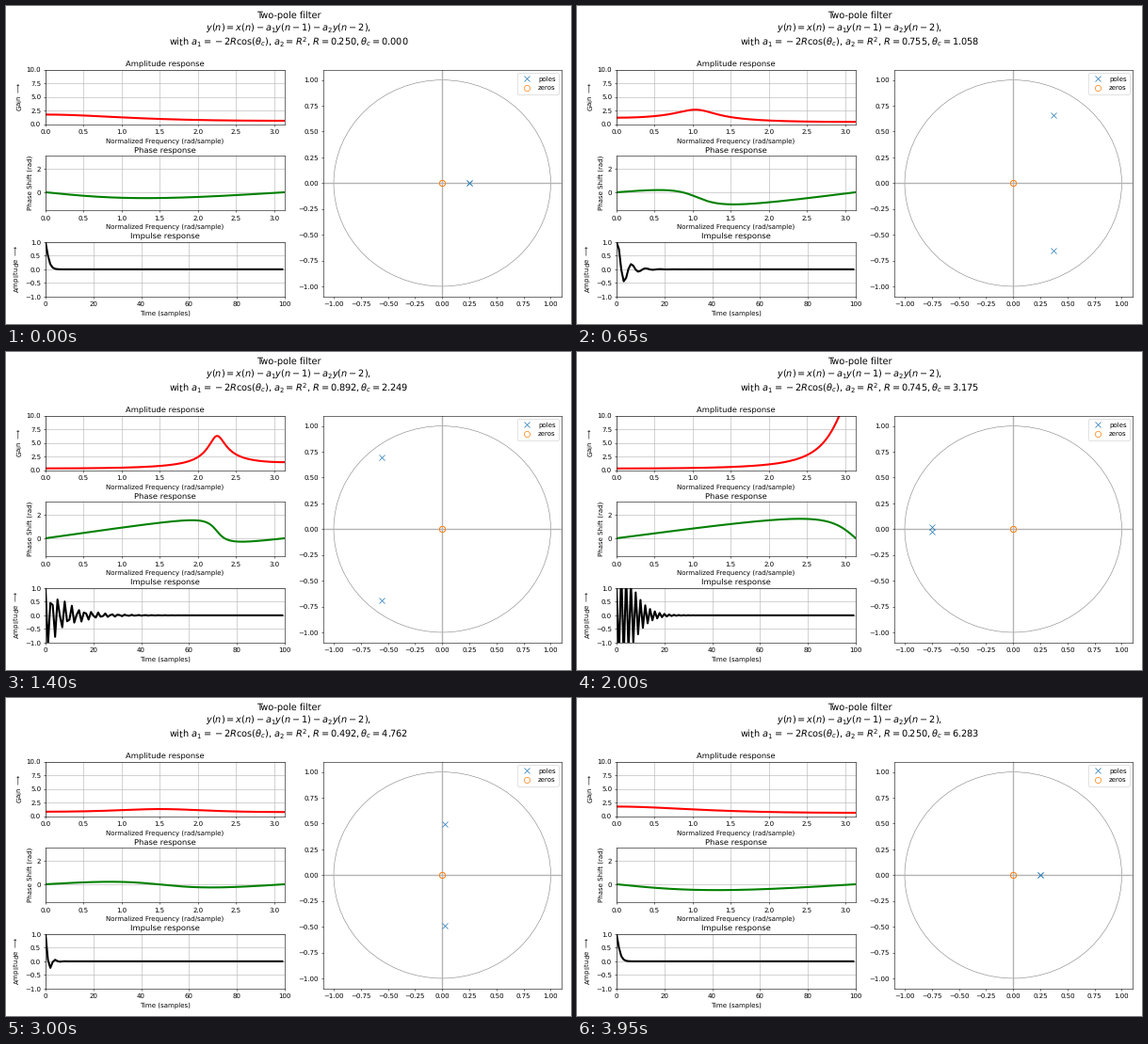
Write a matplotlib script that moves like this. It is 600 px wide and 338 px high and loops after 4000 ms.

```python
import numpy as np
import matplotlib.pyplot as plt
from matplotlib.animation import FuncAnimation
from matplotlib.patches import Circle

W, H, DPI = 600, 338, 50
FRAMES, STEPS = 80, 96
TOP, PANEL, GAP = 67.7, 58, 33.6

plt.rcParams.update({
    "font.family": "DejaVu Sans",
    "font.size": 10,
    "text.hinting": "none",
})

fig = plt.figure(figsize=(W / DPI, H / DPI), dpi=DPI, facecolor="white")


def add_axes(x0, x1, top, bottom):
    return fig.add_axes([x0 / W, 1 - bottom / H, (x1 - x0) / W, (bottom - top) / H])


def panel(row, title, xlabel, ylabel, xlim, ylim, xticks, yticks):
    top = TOP + row * (PANEL + GAP)
    ax = add_axes(42, 296, top, top + PANEL)
    ax.set(title=title, xlabel=xlabel, ylabel=ylabel,
           xticks=xticks, yticks=yticks, xlim=xlim, ylim=ylim)
    ax.grid(True)
    return ax


def headline(baseline, text=""):
    return fig.text(0.5, 1 - baseline / H, text, ha="center", va="baseline", fontsize=14)


freq = "Normalized Frequency (rad/sample)"
freq_ticks = np.arange(0, 3.1, 0.5)
amp_ax = panel(0, "Amplitude response", freq, r"Gain $\longrightarrow$",
               (0, np.pi), (0, 10), freq_ticks, np.arange(0, 10.1, 2.5))
phase_ax = panel(1, "Phase response", freq, "Phase Shift (rad)",
                 (0, np.pi), (-np.pi / 2, np.pi), freq_ticks, [0, 2])
imp_ax = panel(2, "Impulse response", "Time (samples)", r"Amplitude $\longrightarrow$",
               (0, 100), (-1, 1), np.arange(0, 101, 20), np.arange(-1, 1.1, 0.5))

omega = np.linspace(0, np.pi, 400)
samples = np.arange(100)
amp_line, = amp_ax.plot([], [], color="red", lw=3)
phase_line, = phase_ax.plot([], [], color="green", lw=3)
imp_line, = imp_ax.plot([], [], color="black", lw=3)

# Pole-zero plane
plane = add_axes(336.5, 590, TOP, TOP + 3 * PANEL + 2 * GAP)
ticks = np.arange(-1, 1.1, 0.25)
plane.set(xticks=ticks, yticks=ticks, xlim=(-1.1, 1.1), ylim=(-1.1, 1.1))
plane.add_patch(Circle((0, 0), 1, fill=False, ec="0.5", lw=0.8))
plane.axvline(0, color="0.7", lw=2)
plane.axhline(0, color="0.7", lw=2)
poles, = plane.plot([], [], "x", ms=9, color="C0", label="poles")
plane.plot([0, 0], [0, 0], "o", ms=9, mfc="none", color="C1", label="zeros")
plane.legend(loc="upper right")

headline(12.5, "Two-pole filter")
headline(25.7, r"$y(n)=x(n)-a_1y(n-1)-a_2y(n-2)$,")
params = headline(41.5)


def impulse(a1, a2):
    h = np.zeros(len(samples))
    h[0], h[1] = 1, -a1
    for n in range(2, len(h)):
        h[n] = -a1 * h[n - 1] - a2 * h[n - 2]
    return h


def update(i):
    # 24 steps per second shown at 20 frames per second
    u = round(i * 1.2) / (STEPS - 1)
    theta = 2 * np.pi * u
    radius = min(0.25 + 3 * u, 1.25 - u)
    a1, a2 = -2 * radius * np.cos(theta), radius ** 2

    z = np.exp(-1j * omega)
    response = 1 / (1 + a1 * z + a2 * z ** 2)
    amp_line.set_data(omega, np.abs(response))
    phase_line.set_data(omega, np.angle(response))
    imp_line.set_data(samples, impulse(a1, a2))

    x, y = radius * np.cos(theta), radius * np.sin(theta)
    poles.set_data([x, x], [y, -y])
    params.set_text(r"with $a_1=-2R\mathrm{cos}(\theta_c)$, $a_2=R^2$, "
                    rf"$R={radius:.3f}, \theta_c={theta:.3f}$")
    return amp_line, phase_line, imp_line, poles, params


anim = FuncAnimation(fig, update, frames=FRAMES, interval=50, repeat=True, repeat_delay=0)
plt.show()
```
